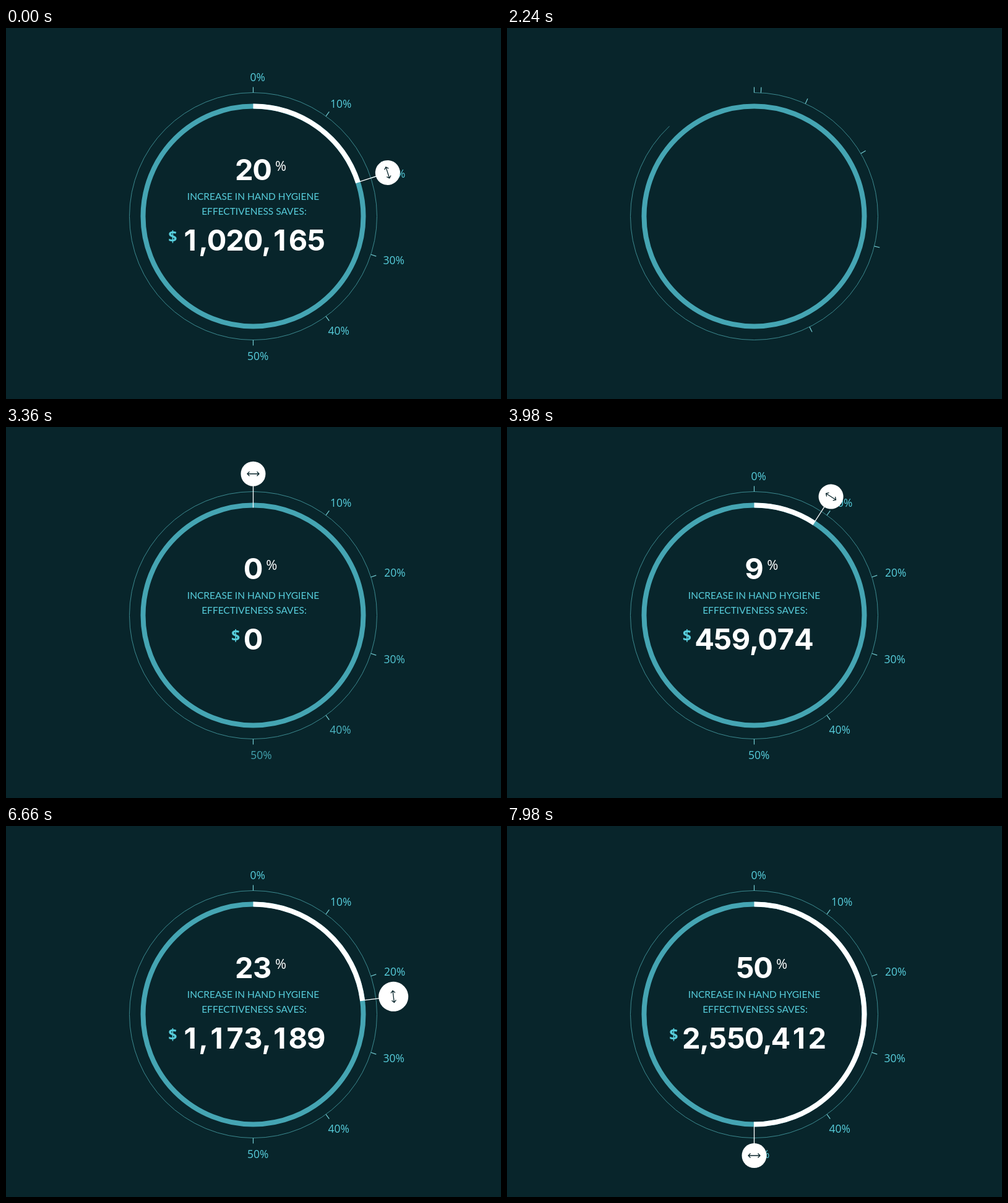
These frames come from a looping animation (800 px wide and 600 px high, 8 s). An HTML page:

```html
<!DOCTYPE html>
<html lang="en">
<head>
<meta charset="utf-8">
<title>Savings dial</title>
<style>
  html, body { margin: 0; width: 100%; height: 100%; overflow: hidden; background: #08252b; }
  svg { display: block; width: 800px; height: 600px; }
  circle, path, line { fill: none; }
  text { fill: #57cddb; }
  .label { font: 500 17.5px "Open Sans", "Noto Sans", sans-serif; text-anchor: end; }
  .caps { font: 400 15.5px Lato, sans-serif; text-anchor: middle; }
  .big { font: 700 47px Inter, sans-serif; text-anchor: middle; fill: #fff; }
  .unit { font: 500 22px "Open Sans", "Noto Sans", sans-serif; fill: #fff; }
  .dollar { font: 700 25px "Open Sans", "Noto Sans", sans-serif; text-anchor: end; }
  .thin { stroke: #3c8a90; stroke-width: 1; }
  .ring { stroke: #45a5b3; stroke-width: 8; }
  .fill { stroke: #fff; stroke-width: 8; }
  .tick { stroke: #74cdd3; stroke-width: 1.2; }
</style>
</head>
<body>
<svg viewBox="0 0 800 600">
  <g transform="translate(399.5 304.5)">
    <g transform="rotate(-90)">
      <circle id="thin" class="thin" r="200" pathLength="360"/>
      <circle id="ring" class="ring" r="178" pathLength="360"/>
      <circle id="fill" class="fill" r="178" pathLength="360"/>
    </g>
    <g id="ticks"></g>
  </g>
  <g id="labels"></g>
  <g id="percent">
    <text id="pctNum" class="big" y="245.5"></text>
    <text id="pctUnit" class="unit" y="231">%</text>
  </g>
  <g id="caption">
    <text class="caps" x="399.5" y="277.5">INCREASE IN HAND HYGIENE</text>
    <text class="caps" x="401" y="301.5">EFFECTIVENESS SAVES:</text>
  </g>
  <g id="amount">
    <text id="dollar" class="dollar" y="345.5">$</text>
    <text id="sum" class="big" y="359.5"></text>
  </g>
  <g id="handle">
    <line id="stem" y1="-174" stroke="#fff" stroke-width="1.3"/>
    <g id="knob">
      <circle id="disc" style="fill:#fff"/>
      <path id="arrow" d="M-9.5 0H9.5M-6 -3.5L-9.5 0L-6 3.5M6 -3.5L9.5 0L6 3.5" stroke="#08252b" stroke-width="1.3"/>
    </g>
  </g>
</svg>
<script>
const LOOP = 8000, INTRO = 1000, CX = 399.5, CY = 304.5;
const DIGIT = 29.4, COMMA = 13.6, PER_POINT = 51008.25, KNOB_AT = 228.5;
const $ = id => document.getElementById(id);

const clamp = u => Math.min(1, Math.max(0, u));
const outQuad = u => 1 - (1 - u) ** 2;
const inOut = n => u => u < .5 ? 2 ** (n - 1) * u ** n : 1 - 2 ** (n - 1) * (1 - u) ** n;
const outBack = u => 1 + 4 * (u - 1) ** 3 + 3 * (u - 1) ** 2;
const linear = u => u;
const tween = (t, start, length, ease) => ease(clamp((t - start) / length));

// Each step: start, length, value to reach, easing
const VALUE = [
  [3450, 666, 9.45, inOut(3)],
  [5100, 570, 23, inOut(2)],
  [6740, 800, 50, inOut(2)]
];
const RADIUS = [
  [2820, 200, 20, linear],
  [5100, 200, 24, linear],
  [7250, 200, 20, linear]
];
const follow = (steps, t) => steps.reduce(
  (v, [start, length, to, ease]) => v + (to - v) * tween(t, start, length, ease), 0);

function add(parent, name, attrs, text = '') {
  const el = document.createElementNS('http://www.w3.org/2000/svg', name);
  for (const key in attrs) el.setAttribute(key, attrs[key]);
  el.textContent = text;
  return parent.appendChild(el);
}

const ticks = [0, 1, 2, 3, 4, 5].map(() =>
  add($('ticks'), 'line', { class: 'tick', y1: -200 }));
const labels = [[419, 85.5], [558.5, 128.5], [645.5, 241.5], [644, 382], [555, 495.5], [424.5, 536.5]]
  .map(([x, y], i) => add($('labels'), 'text', { class: 'label', x, y }, i * 10 + '%'));

const sweep = (el, degrees) => el.setAttribute('stroke-dasharray', degrees + ' 400');

function slideIn(el, p, dx, dy) {
  el.setAttribute('opacity', p);
  el.setAttribute('transform', `translate(${dx * (1 - p)} ${dy * (1 - p)})`);
}

// Sets tabular figures centred on the dial and returns half their width
function setFigures(el, text) {
  const widths = [...text].map(ch => ch === ',' ? COMMA : DIGIT);
  const half = widths.reduce((a, b) => a + b) / 2;
  let left = CX - half;
  const centres = widths.map(w => (left += w) - w / 2);
  el.setAttribute('x', centres.join(' '));
  el.textContent = text;
  return half;
}

function render(t) {
  const held = t < INTRO;
  const now = held ? LOOP : t;
  const value = held ? 20 : follow(VALUE, t);
  const shown = Math.round(value);
  const angle = value * 3.6;

  sweep($('ring'), 360 * tween(now, 1040, 840, inOut(2)));
  sweep($('thin'), 360 * tween(now, 1335, 1200, inOut(2)));
  sweep($('fill'), angle);

  const tickLength = 9 * tween(now, 1250, 150, outQuad);
  ticks.forEach((tick, i) => {
    const turn = 36 * i * tween(now, 2310 - 100 * i, 700, outQuad);
    tick.setAttribute('y2', -200 - tickLength);
    tick.setAttribute('transform', `rotate(${turn})`);
  });
  labels.forEach((label, i) =>
    slideIn(label, tween(now, 2513 + 100 * i, 700, outQuad), 20, 0));

  slideIn($('percent'), tween(now, 2410, 700, outQuad), 0, 20);
  slideIn($('caption'), tween(now, 2490, 700, outQuad), 0, 20);
  slideIn($('amount'), tween(now, 2605, 700, outQuad), 0, 20);

  const pctHalf = setFigures($('pctNum'), String(shown));
  $('pctUnit').setAttribute('x', CX + pctHalf + 6);
  const sumHalf = setFigures($('sum'), Math.floor(shown * PER_POINT).toLocaleString('en-US'));
  $('dollar').setAttribute('x', CX - sumHalf - 6.5);

  const reach = 174 + (KNOB_AT - 174) * tween(now, 2785, 600, outBack);
  const radius = follow(RADIUS, now);
  $('handle').setAttribute('visibility', now < 2785 ? 'hidden' : 'visible');
  $('handle').setAttribute('transform', `translate(${CX} ${CY}) rotate(${angle})`);
  $('stem').setAttribute('y2', -reach);
  $('knob').setAttribute('transform', `translate(0 ${-reach})`);
  $('disc').setAttribute('r', radius);
  $('arrow').setAttribute('transform', `scale(${Math.min(1, radius / 20)})`);
}

const began = performance.now();
function frame() {
  render((performance.now() - began) % LOOP);
  requestAnimationFrame(frame);
}
frame();
</script>
</body>
</html>
```
